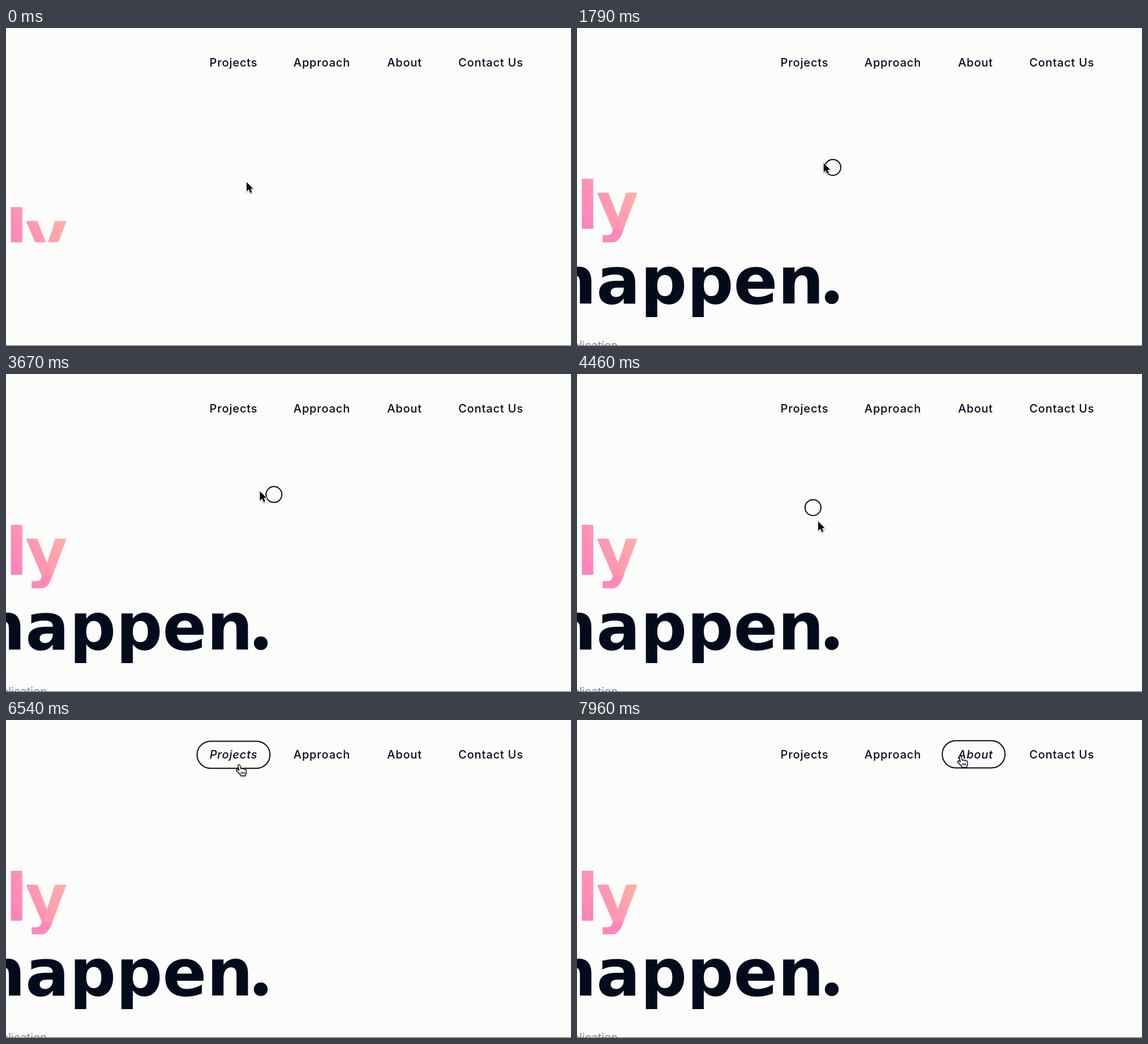
Animation of 998 by 561 pixels, one loop 8000 ms. Source, as an HTML page:

```html
<!DOCTYPE html>
<html lang="en">
<head>
<meta charset="utf-8">
<title>Hero with magnetic cursor</title>
<style>
html, body { margin: 0; width: 100%; height: 100%; overflow: hidden; background: #fcfcfb; }
svg { display: block; width: 998px; height: 561px; }
text { font-family: Inter, "Open Sans", sans-serif; fill: #020b1c; }
.nav text { font-size: 20px; font-weight: 500; letter-spacing: .85px; text-anchor: middle; }
.big text { font: 700 115px "DejaVu Sans", sans-serif; }
.big .dot { font: 800 132px Inter, sans-serif; text-anchor: middle; }
</style>
</head>
<body>
<svg viewBox="0 0 998 561">
  <defs>
    <linearGradient id="blush" gradientUnits="userSpaceOnUse" x1="14" y1="338" x2="104" y2="292">
      <stop offset="0" stop-color="#ff83bb"/>
      <stop offset="1" stop-color="#ffb0a6"/>
    </linearGradient>
    <clipPath id="line1"><rect y="230" width="998" height="148"/></clipPath>
    <clipPath id="line2"><rect y="379" width="998" height="131"/></clipPath>
    <clipPath id="tail"><rect y="356" width="998" height="60"/></clipPath>
    <filter id="shade" x="-50%" y="-50%" width="200%" height="200%">
      <feDropShadow dx="0" dy="1.2" stdDeviation="1.1" flood-opacity=".4"/>
    </filter>
  </defs>

  <g class="nav" id="nav"></g>

  <g class="big" clip-path="url(#line1)">
    <g id="top" letter-spacing="-4.5">
      <text x="-1" y="354" style="fill:url(#blush)">ly</text>
      <text x="-1" y="354" style="fill:#ff88ba" clip-path="url(#tail)">ly</text>
    </g>
  </g>
  <g class="big" clip-path="url(#line2)">
    <text id="bottom" x="-47.5" y="486">happen<tspan class="dot" x="450">.</tspan></text>
  </g>
  <text id="sub" x="72" y="567" text-anchor="end" font-size="20" style="fill:#85858f">application</text>
  <rect y="560" width="998" height="1" fill="#585a50"/>

  <rect id="ring" fill="none" stroke="#020b1c" stroke-width="2"/>
  <g id="mouse" filter="url(#shade)">
    <path id="arrow" d="M0 0V16.2L3.9 12.7 6.6 19 9.4 17.8 6.7 11.6H11.6Z" stroke="#fff" stroke-width="1.6" paint-order="stroke"/>
    <g id="hand" fill="#fff" stroke="#000" stroke-width="1.3" stroke-linejoin="round">
      <path d="M-2.4 1.6C-2.6-.6.4-1 1 1L3 7.4C3.6 6 6 6 6.4 7.6 7.2 6.4 9.2 6.8 9.5 8.4 11 7.6 12 8.6 12.2 10 12.6 13 12 15 11 17L10.6 19.4H2.4L1.6 17C-.2 15-2.6 12.6-4.8 10.6-6.4 8.8-4.4 7.2-2.6 8.4L-.4 10Z"/>
      <path d="M3.4 12.4V16M6 12.4V16M8.6 12.4V16"/>
    </g>
  </g>
</svg>
<script>
const LOOP = 8000, STEP = 10;
const FOLLOW = 200, SNAP = 130; // ring lag in ms: free, and over a link
const NAV_Y = 60.5, PILL = 48, DOT = 28;
const $ = id => document.getElementById(id);

// Links keep a fixed gap; each owns half of it as hover area
const GAP = 64;
let edge = 361;
const links = Object.entries({ Projects: 82, Approach: 102, About: 62, "Contact Us": 115 })
  .map(([label, width]) => {
    const el = document.createElementNS("http://www.w3.org/2000/svg", "text");
    const mid = edge + width / 2;
    el.textContent = label;
    el.setAttribute("x", mid);
    el.setAttribute("y", 68);
    $("nav").append(el);
    edge += width + GAP;
    return { el, mid, width };
  });

// Where the hand steers the mouse: time, x, y
const path = [
  [0, 425, 272], [600, 445, 230], [880, 459, 244], [1400, 470, 255],
  [2600, 380, 200], [2830, 532, 228], [4100, 400, 204], [4460, 426, 260],
  [5300, 402, 240], [5670, 391, 156], [6000, 397, 82], [6540, 412, 79],
  [7500, 645, 64], [LOOP, 680, 64]
];

// Cubic through the points, tangents taken from their neighbours
function mouseAt(t) {
  const last = path.length - 1;
  let i = 0;
  while (i < last - 1 && t >= path[i + 1][0]) i++;
  const a = path[i], b = path[i + 1], h = b[0] - a[0], u = (t - a[0]) / h, v = 1 - u;
  const tangent = (j, c) => {
    const p = path[Math.max(0, j - 1)], q = path[Math.min(last, j + 1)];
    return (q[c] - p[c]) / (q[0] - p[0]);
  };
  return [1, 2].map(c => a[c] * (1 + 2 * u) * v * v + b[c] * u * u * (3 - 2 * u)
    + h * u * v * (tangent(i, c) * v - tangent(i + 1, c) * u));
}

const hovered = ([x, y]) =>
  y < NAV_Y + PILL / 2 + 1 && links.find(l => Math.abs(x - l.mid) < (l.width + GAP) / 2);

// The ring drifts after the mouse and snaps around a hovered link
function ringAt(t) {
  let ring = [...mouseAt(0), DOT, DOT];
  for (let s = 0; s < t; s += STEP) {
    const dt = Math.min(STEP, t - s), mouse = mouseAt(s + dt), link = hovered(mouse);
    const goal = link ? [link.mid, NAV_Y, link.width + PILL, PILL] : [...mouse, DOT, DOT];
    const pull = 1 - Math.exp(-dt / (link ? SNAP : FOLLOW));
    ring = ring.map((value, k) => value + (goal[k] - value) * pull);
  }
  return ring;
}

const clamp = x => Math.min(1, Math.max(0, x));
const move = (el, x, y) => el.setAttribute("transform", `translate(${x} ${y})`);
const show = (el, on) => el.setAttribute("visibility", on ? "visible" : "hidden");

// Share of the rise still to go for each staggered line
const remaining = (t, line) => (1 - clamp((t + 263 - 565 * line) / 1500)) ** 5;

function draw(t) {
  move($("top"), 0, 131 * remaining(t, 0));
  move($("bottom"), 0, 131 * remaining(t, 1));
  move($("sub"), 0, 30 * remaining(t, 2));
  $("sub").setAttribute("opacity", 1 - remaining(t, 2));

  const mouse = mouseAt(t), over = hovered(mouse);
  move($("mouse"), ...mouse);
  show($("arrow"), !over);
  show($("hand"), over);
  for (const l of links) l.el.setAttribute("font-style", l === over ? "italic" : "normal");

  const [x, y, width, height] = ringAt(t);
  const box = { x: x - width / 2, y: y - height / 2, width, height, rx: height / 2, opacity: clamp((t - 60) / 300) };
  for (const k in box) $("ring").setAttribute(k, box[k]);
}

const begin = performance.now();
function tick(now) {
  draw(Math.max(0, now - begin) % LOOP);
  requestAnimationFrame(tick);
}
draw(0);
requestAnimationFrame(tick);
</script>
</body>
</html>
```
